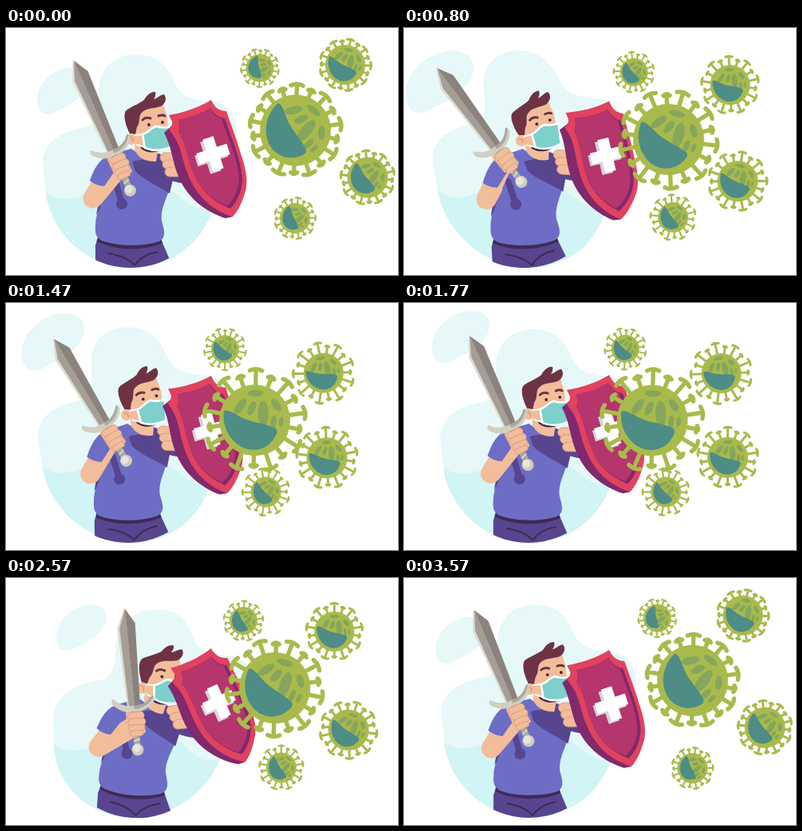
An HTML page for the animation above (3.61 s loop, 491 px wide and 309 px high).

```html
<!DOCTYPE html>
<html lang="en">
<head>
<meta charset="utf-8">
<title>Shield against viruses</title>
<style>
html, body { margin: 0; width: 100%; height: 100%; overflow: hidden; background: #fff; }
svg { display: block; width: 491px; height: 309px; }
</style>
</head>
<body>
<svg viewBox="0 0 491 309" stroke-linecap="round" stroke-linejoin="round">
  <defs>
    <clipPath id="disc"><path d="M0 0H400V197H259A103 103 0 0 1 53 197H0Z"/></clipPath>
    <g id="germ">
      <circle r="1" fill="#a9ba4c"/>
      <g fill="#85a65c">
        <ellipse cx=".03" cy="-.76" rx=".23" ry=".09"/>
        <ellipse cx="-.4" cy="-.4" rx=".11" ry=".26" transform="rotate(38 -.4 -.4)"/>
        <ellipse cx="-.08" cy="-.34" rx=".1" ry=".21" transform="rotate(25 -.08 -.34)"/>
        <ellipse cx=".24" cy="-.18" rx=".15" ry=".37"/>
        <ellipse cx=".61" cy="-.42" rx=".1" ry=".2" transform="rotate(-35 .61 -.42)"/>
        <ellipse cx=".53" cy=".05" rx=".08" ry=".18" transform="rotate(5 .53 .05)"/>
        <ellipse cx=".74" cy=".05" rx=".06" ry=".14" transform="rotate(8 .74 .05)"/>
      </g>
      <path fill="#4e8c86" d="M-.87-.27C-.74-.34-.5-.14-.25-.03C0 .07.3.1.55.21C.7.28.6.42.5.57C.3.82-.02.88-.27.79C-.65.64-.93.22-.87-.27Z"/>
    </g>
  </defs>

  <path id="cloud" fill="#e6f8f8" d="M-32 12C-33-10-9-30 12-30C29-30 36-18 30-4C22 10 12 16-4 23C-18 33-31 31-32 12Z"/>

  <g id="backdrop">
    <path fill="#e6f8f8" d="M46 170C46 140 75 128 100 124C126 118 112 85 118 65C124 42 145 33 163 33C190 33 203 48 212 70C222 92 245 90 262 93C300 100 292 150 275 180C262 200 262 215 259 225C245 275 200 300 156 300C95 298 55 250 50 206Z"/>
    <path fill="#d1f4f4" d="M50 206C70 220 90 212 110 204C145 190 185 190 208 204C228 217 240 236 261 222C245 275 200 300 156 300C95 298 55 250 50 206Z"/>
  </g>

  <g class="torso">
    <g clip-path="url(#disc)">
      <path fill="#57458f" d="M116 258L112 272V302H206V292L194 264Z"/>
      <path fill="#402a54" d="M117 257C140 270 170 270 194 263L196 269C170 280 136 278 114 267Z"/>
      <path fill="none" stroke="#402a54" stroke-width="2" d="M129 282Q152 286 161 297Q170 284 190 280"/>
    </g>

    <path fill="#57458f" d="M186 158C205 165 216 178 232 184L228 195C214 194 202 190 196 186Z"/>
    <path fill="#6d6dc5" d="M157 151C140 156 127 158 120 167L110 190L121 199C121 218 112 232 112 248C111 258 114 263 120 266C142 274 174 273 192 267C201 262 198 253 196 245C191 228 203 212 206 196L208 180C206 168 200 159 189 156L172 161Z"/>
    <path fill="#57458f" d="M158 167C168 164 186 165 190 157C204 162 208 176 209 190L205 207C190 197 172 190 162 179Z"/>
    <path fill="#57458f" d="M119 203L131 192L116 229L113 234Z"/>
    <path stroke="#57458f" stroke-width="8" d="M137 191L144 216"/>
    <circle cx="145" cy="220" r="7" fill="#57458f"/>

    <g id="head">
      <path fill="#f2bd9a" d="M163 136L161 152Q168 168 188 167L191 150Z"/>
      <path fill="none" stroke="#3f2a4c" stroke-width="5" d="M171 149Q180 156 193 151"/>
      <path fill="#f2bd9a" d="M159 112Q172 94 197 95L202 112L204 145Q190 156 172 150L160 143Z"/>
      <path fill="#6d3345" d="M155 132C150 122 145 106 152 102C160 97 168 94 173 90C178 81 183 80 187 80C188 83 187 86 185 89C190 88 192 84 198 83C202 88 200 94 194 98C184 101 176 100 171 105C165 109 169 118 164 124L162 133Z"/>
      <circle cx="157" cy="139" r="7" fill="#f2bd9a"/>
      <path fill="none" stroke="#dc977a" stroke-width="1.4" d="M154 137Q159 135 159 142"/>
      <path fill="none" stroke="#6d3345" stroke-width="3" d="M171 115Q175 111 181 113M191 110Q196 108 199 110"/>
      <circle cx="179" cy="121" r="1.9" fill="#442738"/><circle cx="196" cy="118" r="1.9" fill="#442738"/>
      <path fill="none" stroke="#fff" stroke-width="2" d="M161 134L171 133M164 146L174 149"/>
      <path fill="#7ed0cd" stroke="#fff" stroke-width="2.5" d="M171 133C179 131 181 124 189 123C196 126 201 124 206 124V149C195 154 184 154 174 150Z"/>
    </g>
  </g>

  <path id="arm" fill="none" stroke="#f2bd9a" stroke-width="25"/>
  <path class="torso" fill="#6d6dc5" d="M124 162C114 168 109 180 105 191Q112 197 123 198L137 178Z"/>

  <g id="sword">
    <path fill="#f2bd9a" d="M-11-13Q0-18 11-12L12 13Q0 20-10 12Z"/>
    <path fill="#dedbd0" d="M-1-144L-12-119L-8-18H7L10-123Z"/>
    <path fill="#a59e96" d="M0-143L-9-119L-6-18H1Z"/>
    <path fill="#8c827d" d="M0-143L11-124L8-18H1Z"/>
    <path fill="#d1cfc0" d="M-25-32Q-29-29-26-24Q-15-12 0-13Q16-12 26-25Q28-31 24-32Q15-20 0-21Q-15-20-25-32Z"/>
    <path fill="#aaa79c" d="M0-21Q15-20 24-32L26-31Q17-16 0-17Z"/>
    <path stroke="#aaa8a0" stroke-width="8" stroke-linecap="butt" d="M0-14V29"/>
    <path stroke="#d9d7cb" stroke-width="2" d="M-3 17L3 15M-3 23L3 21"/>
    <circle cy="34" r="7.5" fill="#cfccbd"/><circle cx="-1" cy="32" r="5" fill="#e8e6dc"/>
    <g fill="#f2bd9a" stroke="#dc977a" stroke-width=".8">
      <rect x="-9" y="-13" width="21" height="9" rx="4.5"/>
      <rect x="-9" y="-5" width="22" height="9" rx="4.5"/>
      <rect x="-9" y="3" width="20" height="8" rx="4"/>
      <rect x="-8" y="10" width="17" height="7" rx="3.5"/>
    </g>
  </g>

  <g id="shield">
    <g fill="#f2bd9a" stroke="#dc977a" stroke-width=".8">
      <rect x="193" y="156" width="24" height="12" rx="6"/>
      <rect x="196" y="165" width="24" height="11" rx="5.5"/>
      <rect x="199" y="174" width="23" height="12" rx="6"/>
    </g>
    <path fill="#80296d" d="M198 131L208 122L214 140L280 225L284 236L275 238C250 230 228 213 217 188C208 168 208 149 198 131Z"/>
    <path fill="#e0425f" d="M204 109C222 106 241 100 257 90C261 99 267 104 276 104C281 119 289 139 294 157C301 177 304 194 299 207C295 220 290 230 284 236C263 230 241 214 230 188C221 169 220 149 210 135L204 127Q209 122 208 117Z"/>
    <path fill="#80296d" d="M216 115C232 112 246 107 256 100C261 108 266 112 274 113C282 137 295 165 296 190C295 207 289 217 281 226C258 217 242 202 235 181C227 163 226 145 216 130Q219 124 216 115Z"/>
    <path fill="#b5356d" d="M216 115C232 112 246 107 256 100C259 107 264 112 270 113C278 137 291 165 292 188C291 204 286 214 277 223C256 214 242 202 235 181C227 163 226 145 216 130Q219 124 216 115Z"/>
    <g transform="translate(259.500 157.500) rotate(-18)" stroke-linecap="butt" stroke-width="14">
      <path stroke="#d6d3dd" d="M-4-19V23M-23 2H17"/>
      <path stroke="#fff" d="M0-21V21M-20 0H20"/>
    </g>
  </g>
  <g id="germs"></g>
</svg>
<script>
const LOOP = 3610;
const TIMES = [0, 430, 880, 1170, 1480, 1770, 2170, 2570, 3030, 3570];
const tracks = {
  lean:  [0, -10, -16.5, -15.5, -9, -1, 12, 21, 14.5, 1],
  sword: [23.5, 31.2, 36.8, 35.8, 30.5, 24.3, 13.7, 5.2, 11, 22.5],
  near:  [0, .39, .78, 1, 1.04, .97, .73, .49, .265, .02],
  late:  [0, .33, .66, .87, .99, 1, .76, .5, .26, .02],
  cx:    [71, 57.5, 44, 47, 59, 71, 85, 94.5, 86.5, 71.5],
  cy:    [79, 75, 66, 59, 49, 43, 50, 62.5, 73, 78.5],
  size:  [1, 1.16, 1.33, 1.3, 1.22, 1.12, 1.04, .98, .98, 1]
};
// start and end of x, y, turn; body radius, spike reach, pace
const germs = [
  { x: [318, 276], y: [50, 57.5], turn: [60, 20], r: 17.5, reach: [1.43, 1.56], pace: 'near' },
  { x: [425, 397.5], y: [46, 88], turn: [10, -14], r: 25, reach: [1.36, 1.6], pace: 'late' },
  { x: [453, 404], y: [187, 193.5], turn: [34, -3], r: 25.5, reach: [1.39, 1.56], pace: 'near' },
  { x: [362, 327], y: [238, 236.5], turn: [47, 28], r: 19, reach: [1.43, 1.62], pace: 'near' },
  { x: [362.5, 311], y: [128, 147], turn: [40, -1], r: 44.5, reach: [1.36, 1.5], pace: 'late' }
];
const $ = id => document.getElementById(id);
const mix = ([a, b], p) => a + (b - a) * p;
const n = TIMES.length;
const wrap = i => (i + n) % n;
const span = i => (i === n - 1 ? LOOP : TIMES[i + 1]) - TIMES[i];
const slope = (v, i) => (v[wrap(i + 1)] - v[i]) / span(i);

// periodic monotone cubic
function tangent(v, i) {
  const a = slope(v, wrap(i - 1)), b = slope(v, i);
  return a * b <= 0 ? 0 : 2 * a * b / (a + b);
}
function sample(v, t) {
  let i = n - 1;
  while (TIMES[i] > t) i--;
  const j = wrap(i + 1), d = span(i), u = (t - TIMES[i]) / d, w = 1 - u;
  return w * w * ((1 + 2 * u) * v[i] + u * d * tangent(v, i)) +
         u * u * ((3 - 2 * u) * v[j] - w * d * tangent(v, j));
}

// long and short spikes in turn, each a stem with a curved cap
function spikes(reach) {
  let d = '';
  for (let k = 0; k < 18; k++) {
    const long = k % 2 === 0;
    const a = (72 + k * 20) * Math.PI / 180;
    const top = long ? reach - .06 : 1 + (reach - 1) * .62;
    const half = long ? .17 : .09;
    const at = (r, s) => {
      const x = Math.cos(a) * r - Math.sin(a) * s, y = Math.sin(a) * r + Math.cos(a) * s;
      return x.toFixed(3) + ' ' + y.toFixed(3);
    };
    d += `M${at(.95, 0)}L${at(top, 0)}M${at(top - .04, -half)}Q${at(top + .04, 0)} ${at(top - .04, half)}`;
  }
  return d;
}

for (const g of germs) {
  $('germs').insertAdjacentHTML('beforeend',
    '<g><path fill="none" stroke="#a9ba4c" stroke-width=".12"/><use href="#germ"/></g>');
  g.el = $('germs').lastElementChild;
}
const torso = document.querySelectorAll('.torso');
const place = (el, transform) => el.setAttribute('transform', transform);

function draw(t) {
  const s = {};
  for (const key in tracks) s[key] = sample(tracks[key], t);
  const k = s.lean, tall = 1 - k * .0011;

  place($('cloud'), `translate(${s.cx} ${s.cy}) scale(${s.size})`);
  place($('backdrop'), `matrix(1 0 ${-k / 230} ${tall} ${k * 315 / 230} ${300 * (1 - tall)})`);
  for (const el of torso) place(el, `rotate(${k * .18} 156 318)`);
  place($('head'), `rotate(${k * .28} 178 155)`);

  const hx = 142 + k * .95, hy = 172 + k * .42;
  const ex = 109 + k * .35, ey = 213 - k * .08;
  $('arm').setAttribute('d', `M${117 + k * .38} 200L${ex} ${ey}L${hx - 4} ${hy + 6}`);
  place($('sword'), `translate(${hx} ${hy}) rotate(${-s.sword})`);
  place($('shield'), `translate(0 ${-k * .1}) rotate(${-k * .3} 257 91)`);

  for (const g of germs) {
    const p = s[g.pace];
    place(g.el, `translate(${mix(g.x, p)} ${mix(g.y, p)}) rotate(${mix(g.turn, p)}) scale(${g.r})`);
    g.el.firstChild.setAttribute('d', spikes(mix(g.reach, p)));
  }
}

const start = performance.now();
function tick() {
  draw((performance.now() - start) % LOOP);
  requestAnimationFrame(tick);
}
tick();
</script>
</body>
</html>
```
